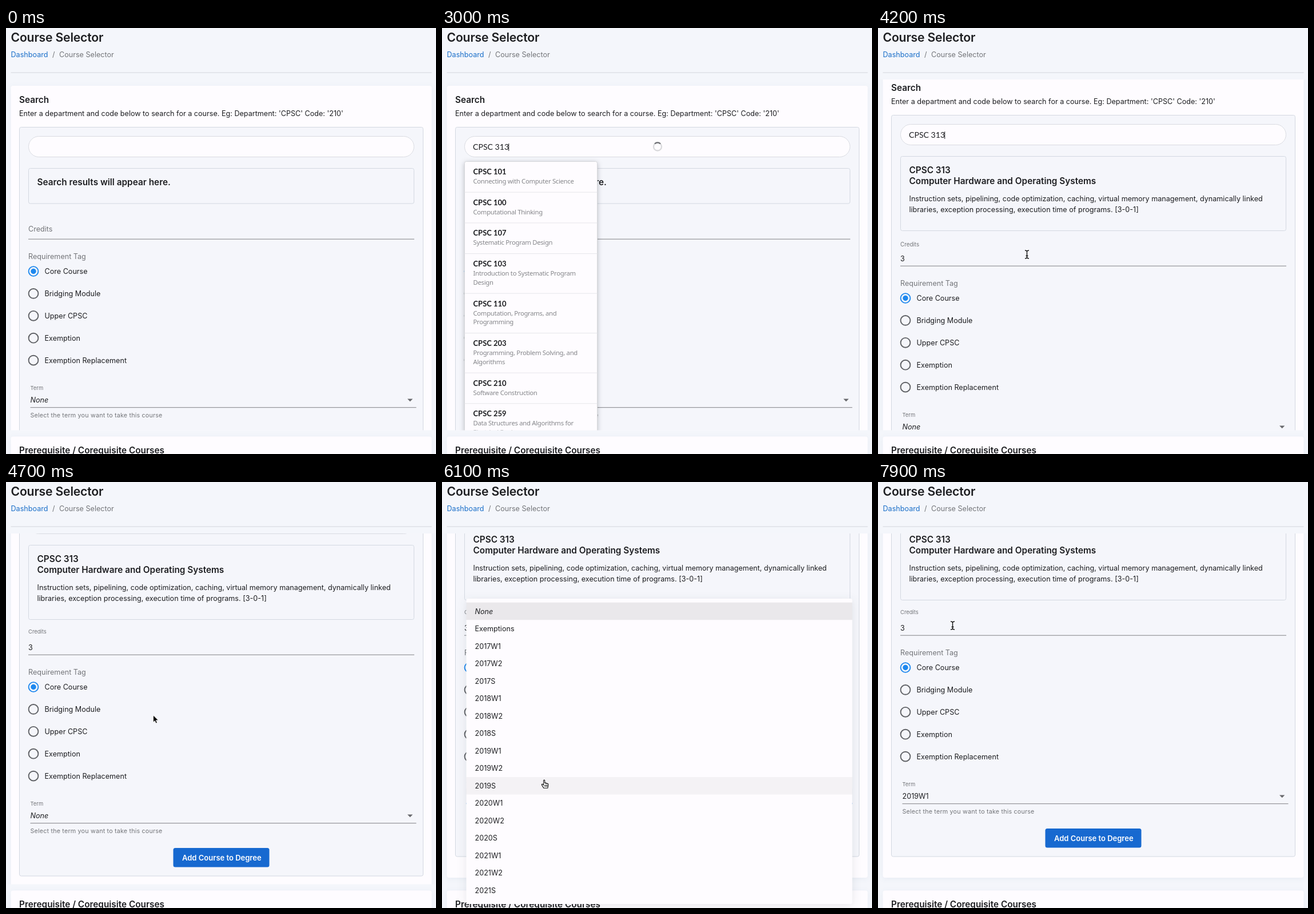
An HTML page for the animation above (8 s loop, 752 by 745 pixels).

```html
<!DOCTYPE html>
<html lang="en">
<head>
<meta charset="utf-8">
<title>Course Selector</title>
<style>
  html, body { margin: 0; height: 100%; overflow: hidden; background: #f4f6fb; }
  svg { display: block; width: 100vw; height: 100vh; }
  text { font: 12.6px Inter, sans-serif; fill: #1d1e21; white-space: pre; }
  .title { font-size: 21.2px; font-weight: 600; letter-spacing: -.2px; }
  .head { font-size: 15.35px; font-weight: 600; }
  .gray { fill: #737579; }
  .link { fill: #1a6fc9; }
  .small { font-size: 9.45px; }
  .help { font-size: 10.75px; letter-spacing: .18px; }
  .italic { font-style: italic; }
  .button { font-size: 13px; font-weight: 600; fill: #fff; }
  .typed { font: 14.1px Lato, sans-serif; }
  .code { font: bold 13px Lato, sans-serif; }
  .desc { font: 11.3px "Noto Sans", sans-serif; letter-spacing: -.3px; fill: #85868a; }
  .card { fill: #fefcff; filter: drop-shadow(0 2px 5px rgba(40, 60, 120, .06)); }
  .panel { fill: #f5f6fb; stroke: #d3d8e1; }
  .field { fill: #fefcff; stroke: #d9dbe1; }
  .popup { filter: drop-shadow(0 2px 4px rgba(30, 35, 50, .28)); }
  .menu { fill: #fefcff; filter: drop-shadow(0 3px 8px rgba(30, 35, 50, .1)); }
</style>
</head>
<body>
<svg id="stage" viewBox="0 0 752 745"></svg>
<script>
const LOOP = 8000, STEP = 100;
const T = {
  focus: 1500, spinner: 2500, list: 2800, filtered: 3300, pick: 3600, result: 4100,
  menuOpen: 5600, menuPick: 6980, blur: 7500
};
const TYPING = [[1900, 'C'], [2000, 'CP'], [2100, 'CPS'], [2300, 'CPSC'], [2500, 'CPSC '],
  [2700, 'CPSC 3'], [2800, 'CPSC 31'], [2900, 'CPSC 313']];
const SCROLL = [[4100, 0], [4200, 21], [4400, 80], [4600, 122], [4800, 148], [5000, 162], [5300, 169]];
const POINTER = [
  [700, 640, 300, 'arrow'], [1000, 600, 285, 'arrow'], [1300, 480, 223, 'beam'],
  [1500, 446, 211, 'beam'], [1600, 447, 210, 'beam'], [1900, 447, 210, ''],
  [3200, 408, 215, 'beam'], [3400, 200, 245, 'hand'], [3600, 130, 258, 'hand'],
  [3700, 140, 268, 'arrow'], [4100, 258, 392, 'beam'], [4200, 260.5, 396, 'beam'],
  [4400, 260, 396, 'arrow'], [5000, 255, 420, 'arrow'], [5400, 197.5, 565, 'arrow'],
  [5500, 192, 553, 'hand'], [5800, 190, 550, 'hand'], [6600, 160, 472, 'hand'],
  [6980, 166, 470, 'hand'], [7100, 353.5, 597.5, 'hand'], [7300, 345, 560, 'arrow'],
  [7600, 230, 385, 'arrow'], [7800, 145, 270, 'arrow'], [7900, 130.5, 251, 'beam'], [8000, 130, 251, 'beam']
];
const COURSES = [
  ['CPSC 101', 'Connecting with Computer Science'],
  ['CPSC 100', 'Computational Thinking'],
  ['CPSC 107', 'Systematic Program Design'],
  ['CPSC 103', 'Introduction to Systematic Program', 'Design'],
  ['CPSC 110', 'Computation, Programs, and', 'Programming'],
  ['CPSC 203', 'Programming, Problem Solving, and', 'Algorithms'],
  ['CPSC 210', 'Software Construction'],
  ['CPSC 259', 'Data Structures and Algorithms for', 'Electrical Engineers']
];
const CHOSEN = ['CPSC 313', 'Computer Hardware and Operating', 'Systems'];
const TAGS = ['Core Course', 'Bridging Module', 'Upper CPSC', 'Exemption', 'Exemption Replacement'];
const TERMS = ['None', 'Exemptions',
  ...[2017, 2018, 2019, 2020, 2021].flatMap(year => ['W1', 'W2', 'S'].map(part => year + part))];
const PICKED = TERMS.indexOf('2019W1');

const clamp = v => Math.min(1, Math.max(0, v));
const easeOut = v => 1 - (1 - clamp(v)) ** 3;
const ease = v => 1 - (1 - clamp(v)) ** 3 * (1 + 1.5 * clamp(v));

// Linear interpolation of the numeric columns of a key list.
function sample(keys, t) {
  const next = keys.findIndex(key => key[0] > t);
  if (next === 0) return keys[0];
  if (next < 0) return keys.at(-1);
  const a = keys[next - 1], b = keys[next], f = (t - a[0]) / (b[0] - a[0]);
  return a.map((v, i) => typeof v === 'number' ? v + (b[i] - v) * f : v);
}

const text = (x, y, str, cls = '') => `<text x="${x}" y="${y}" class="${cls}">${str}</text>`;
const rect = (x, y, w, h, attrs) => `<rect x="${x}" y="${y}" width="${w}" height="${h}" ${attrs}/>`;
const line = (x1, x2, y, color, width = 1) =>
  `<path d="M${x1} ${y}H${x2}" stroke="${color}" stroke-width="${width}"/>`;
const group = (transform, body, attrs = '') => `<g transform="${transform}" ${attrs}>${body}</g>`;

function searchBox(t) {
  const typed = TYPING.findLast(key => key[0] <= t)?.[1] ?? '';
  const caret = t >= T.focus ? `<tspan dx="${typed ? -2 : -1.5}">|</tspan>` : '';
  let out = rect(39.5, 189.5, 674, 36, 'rx="18" class="field"') + text(54, 213, typed + caret, 'typed');
  if (t >= T.spinner && t < T.result) {
    out += group(`translate(377 207.5) rotate(${(t - 3000) * .6})`,
      '<circle r="7" fill="none" stroke="#d9d9dc" stroke-width="2.3"/>' +
      '<path d="M-5 -5A7 7 0 0 1 5 -5" fill="none" stroke="#707176" stroke-width="2.3"/>');
  }
  return out;
}

function resultBox(loaded) {
  const box = rect(39.5, 245.5, 674, loaded ? 130 : 61.5, 'rx="3" class="panel"');
  if (!loaded) return box + text(54.5, 275, 'Search results will appear here.', 'head');
  return box + text(54.5, 275, 'CPSC 313', 'head') +
    text(54.5, 293.5, 'Computer Hardware and Operating Systems', 'head') +
    text(54.5, 324, 'Instruction sets, pipelining, code optimization, caching, virtual memory management, dynamically linked') +
    text(54.5, 342.5, 'libraries, exception processing, execution time of programs. [3-0-1]');
}

function radio(label, i) {
  const y = 425.5 + 38.9 * i, color = i ? '#606266' : '#1e88ee';
  return `<circle cx="48" cy="${y}" r="8.4" fill="none" stroke="${color}" stroke-width="1.9"/>` +
    (i ? '' : `<circle cx="48" cy="${y}" r="4.7" fill="${color}"/>`) + text(67.5, y + 4.5, label);
}

function form(t, loaded) {
  const shrink = easeOut((t - T.result) / 200);
  const focused = t >= T.menuOpen && t < T.blur, picked = t >= T.menuPick;
  return group(`translate(39 ${356 - 23.6 * shrink}) scale(${1 - .25 * shrink})`, text(0, 0, 'Credits', 'gray')) +
    (loaded ? text(39, 360.5, '3') : '') +
    line(39, 714, 369.2, '#808185') +
    text(39, 404, 'Requirement Tag', 'gray') +
    TAGS.map(radio).join('') +
    (focused ? rect(42.5, 637.5, 675, 26, 'fill="#000" fill-opacity=".05"') : '') +
    text(42.5, 632.5, 'Term', focused ? 'small link' : 'small gray') +
    text(42.5, 655, picked ? '2019W1' : 'None', picked ? '' : 'italic') +
    '<path d="M702 648.5H711.4L706.7 653.3Z" fill="#68696d"/>' +
    (focused ? line(42.5, 717.5, 663.3, '#1a6fd0', 2) : line(42.5, 717.5, 663.7, '#808185')) +
    text(42.5, 680.5, 'Select the term you want to take this course', 'help gray') +
    rect(292.5, 707, 168, 33.5, 'rx="3.5" fill="#1769d0"') +
    text(308, 728.5, 'Add Course to Degree', 'button');
}

function courseList(t) {
  if (t < T.list || t >= T.pick) return '';
  let y = 233.5, rows = '';
  for (const [code, ...lines] of t < T.filtered ? COURSES : [CHOSEN]) {
    if (y > 233.5) rows += line(39.5, 271.5, y, '#e6e6ea');
    rows += text(54.5, y + 22.5, code, 'code') +
      lines.map((str, i) => text(54.5, y + 38.5 + 15.8 * i, str, 'desc')).join('');
    y += 37.9 + 15.8 * lines.length;
  }
  return rect(39.5, 233.5, 232, y - 233.5, 'rx="3" fill="#fefcff" stroke="#d6d7db" class="popup"') + rows;
}

function termMenu(t, pointerY) {
  const open = t - T.menuOpen, close = t - T.menuPick;
  if (open < 0 || close > 364) return '';
  const top = 210.7, rowHeight = 30.53, closing = close >= 0;
  const opacity = closing ? 1 - ease(close / 364) : ease(open / 364);
  const grow = closing ? 1 - ease((close - 121) / 243) : ease(open / 243);
  const selected = closing ? PICKED : 0;
  const hovered = closing ? -1 : Math.floor((pointerY - top) / rowHeight);
  const shade = (i, alpha) => i < 0 ? '' :
    rect(42.5, top + i * rowHeight, 675, rowHeight, `fill="#000" fill-opacity="${alpha}"`);
  const body = rect(42.5, 204, 675, 534, 'rx="3" class="menu"') +
    shade(selected, .08) + (hovered === selected ? '' : shade(hovered, .04)) +
    TERMS.map((term, i) => text(57.5, top + 19.8 + i * rowHeight, term, i ? '' : 'italic')).join('');
  return group(`translate(380 549) scale(${.75 + .25 * grow} ${.5625 + .4375 * grow}) translate(-380 -549)`,
    body, `opacity="${opacity}"`);
}

const SHAPES = {
  arrow: '<path d="M0 0V12.2L2.8 9.6 4.7 14 6.9 13 5 8.8H8.9Z" fill="#000" stroke="#fff" stroke-width=".8"/>',
  beam: '<path d="M-3.5 -7Q0 -7 0 -5Q0 -7 3.5 -7M0 -5.5V5.5M-3.5 7Q0 7 0 5Q0 7 3.5 7M-2 2.5H2" fill="none" stroke="#111" stroke-width="1.4"/>',
  hand: '<path transform="translate(-5 0)" d="M4 14.5C3 12 1 10.5 .6 8.6C.5 7.4 2 7.3 3 8.4L3.9 9.2V1.6C4 -.1 6 -.1 6 1.6V6C6.3 5 8.1 5.2 8.2 6.4C8.6 5.6 10.2 5.8 10.3 7C10.8 6.3 12.1 6.7 12.1 8C12.1 11 11.6 12.6 11 14.5Z M6.2 9V12M8.2 9V12M10.1 9V12" fill="#fff" stroke="#111" stroke-width="1.1"/>'
};

function scene(t) {
  const loaded = t >= T.result, shift = loaded ? 68 : 0;
  const scroll = sample(SCROLL, t)[1];
  const [start, px, py, shape] = sample(POINTER, t);
  const content = rect(8.5, 101, 736, 692 + shift, 'rx="4" class="card"') +
    text(23, 130.5, 'Search', 'head') +
    text(23, 154, "Enter a department and code below to search for a course. Eg: Department: 'CPSC' Code: '210'") +
    rect(23.5, 173.5, 706, 582.5 + shift, 'rx="3" class="panel"') +
    searchBox(t) + resultBox(loaded) +
    group(`translate(0 ${shift})`, form(t, loaded)) +
    courseList(t);
  return '<clipPath id="view"><rect y="90" width="752" height="613.5"/></clipPath>' +
    rect(0, 0, 752, 745, 'fill="#f4f6fb"') +
    text(8.5, 24, 'Course Selector', 'title') +
    text(8.5, 51, 'Dashboard', 'link') + text(81, 51, '/', 'gray') + text(93, 51, 'Course Selector', 'gray') +
    line(8.5, 744.5, 78, '#d2d5db') +
    `<g clip-path="url(#view)">${group(`translate(0 ${-scroll})`, content)}</g>` +
    rect(8.5, 714.5, 736, 60, 'rx="4" class="card"') +
    text(23, 744, 'Prerequisite / Corequisite Courses', 'head') +
    termMenu(t, py) +
    (t >= start && shape ? group(`translate(${px} ${py})`, SHAPES[shape]) : '');
}

const stage = document.getElementById('stage');
let shown = -1;
function tick() {
  const t = Math.floor(performance.now() % LOOP / STEP) * STEP;
  if (t !== shown) stage.innerHTML = scene(shown = t);
  requestAnimationFrame(tick);
}
tick();
</script>
</body>
</html>
```
